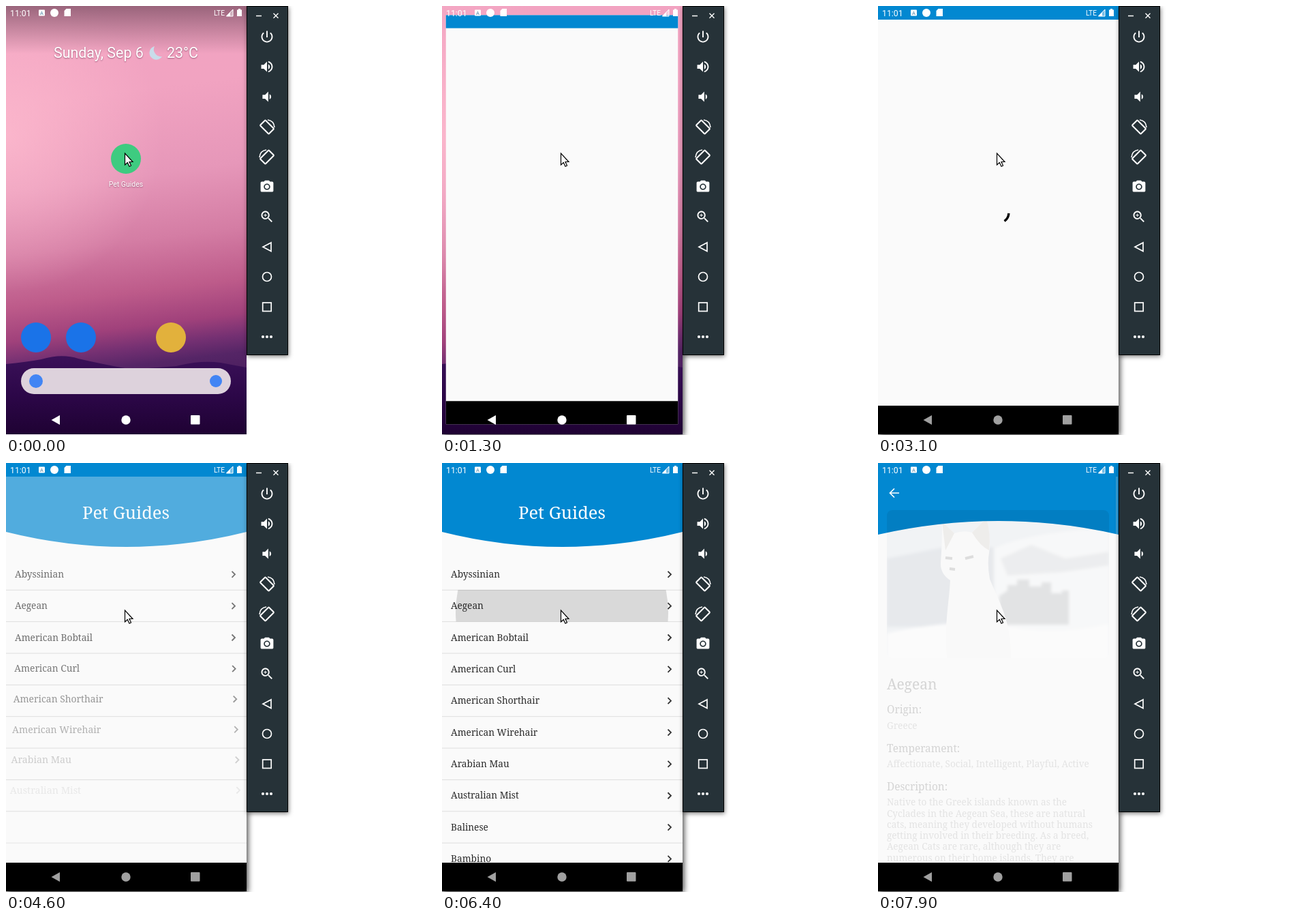
Recreate the animation shown at these times as an HTML page. Size 631x629 px, loop 8 s.

```html
<!DOCTYPE html>
<html lang="en">
<head>
<meta charset="utf-8">
<title>Phone demo</title>
<style>
html, body { margin: 0; width: 100%; height: 100%; overflow: hidden; background: #fff; }
svg { display: block; width: 631px; height: 629px; }
.sans { font-family: Roboto, sans-serif; fill: #fff; }
.serif { font-family: "Noto Serif", serif; }
.soft { text-shadow: 0 1px 2px rgba(60, 0, 40, .45); }
#shadow { filter: drop-shadow(2px 2px 4px rgba(0, 0, 0, .75)); }
#panel { filter: drop-shadow(1px 2px 3px rgba(0, 0, 0, .5)); }
.blur { filter: blur(2px); }
</style>
</head>
<body>
<svg viewBox="0 0 631 629">
  <defs>
    <linearGradient id="sky" x1=".46" y1="0" x2=".53" y2="1">
      <stop offset="0" stop-color="#f2a3c1"/>
      <stop offset=".2" stop-color="#f1a3c1"/>
      <stop offset=".4" stop-color="#e697b9"/>
      <stop offset=".55" stop-color="#d47da4"/>
      <stop offset=".67" stop-color="#bd5b8a"/>
      <stop offset=".75" stop-color="#a0417b"/>
      <stop offset=".8" stop-color="#743072"/>
      <stop offset=".84" stop-color="#552566"/>
      <stop offset="1" stop-color="#351050"/>
    </linearGradient>
    <radialGradient id="glow" gradientUnits="userSpaceOnUse" cx="0" cy="190" r="230">
      <stop offset="0" stop-color="#ffbdd0" stop-opacity=".75"/>
      <stop offset="1" stop-color="#ffbdd0" stop-opacity="0"/>
    </radialGradient>
    <linearGradient id="scrim" x1="0" y1="0" x2="0" y2="1">
      <stop offset="0" stop-color="#3a2030" stop-opacity=".48"/>
      <stop offset="1" stop-color="#3a2030" stop-opacity="0"/>
    </linearGradient>
    <linearGradient id="hill" x1="0" y1="0" x2="0" y2="1">
      <stop offset="0" stop-color="#3b1159"/>
      <stop offset=".5" stop-color="#2c0748"/>
      <stop offset="1" stop-color="#1f0233"/>
    </linearGradient>
    <clipPath id="screen"><rect width="353" height="628"/></clipPath>
    <clipPath id="body"><rect width="353" height="586"/></clipPath>
    <clipPath id="winClip"><rect id="winRect" width="353" height="628"/></clipPath>
    <clipPath id="row"><rect y="186" width="353" height="46.5"/></clipPath>
    <clipPath id="photoClip"><rect x="13" y="69" width="326" height="217" rx="8"/></clipPath>
    <clipPath id="headClip"><path d="M0 0H353V105Q176.5 65 0 105Z"/></clipPath>
  </defs>

  <rect id="shadow" width="353" height="628" fill="#222"/>
  <g clip-path="url(#screen)">
    <rect width="353" height="628" fill="url(#sky)"/>
    <rect width="353" height="480" fill="url(#glow)"/>
    <path d="M0 525Q30 522 52 518Q82 509 106 517Q145 526 180 532Q215 531 250 528Q285 519 315 523L353 530V628H0Z" fill="url(#hill)"/>

    <g id="home">
      <rect width="353" height="70" fill="url(#scrim)"/>
      <g class="sans soft" font-size="21.4">
        <text x="70" y="76">Sunday, Sep 6</text>
        <text x="236" y="76">23°C</text>
        <text x="176" y="265" font-size="10.5" text-anchor="middle">Pet Guides</text>
      </g>
      <path d="M218 59A10 10 0 1 0 229 74A10.500 10.500 0 0 1 218 59Z" fill="#c9dcea"/>
      <circle id="icon" cx="176" cy="224" r="22" fill="#3ecb80"/>
      <circle cx="44" cy="486" r="22" fill="#1a73e8"/>
      <circle cx="110" cy="486" r="22" fill="#1a73e8"/>
      <circle cx="242" cy="486" r="22" fill="#e2b13c"/>
      <rect x="22" y="531" width="308" height="38" rx="19" fill="#ddd2dc"/>
      <circle cx="44" cy="550" r="10" fill="#4285f4"/>
      <circle cx="308" cy="550" r="9" fill="#4285f4"/>
    </g>

    <g id="win"><g clip-path="url(#winClip)">
      <rect width="353" height="628" fill="#fafafa"/>
      <rect width="353" height="20" fill="#0288d1"/>
      <g clip-path="url(#body)">
        <g id="list">
          <g id="lines" stroke="#dedede"></g>
          <g clip-path="url(#row)"><circle id="ripple" cx="176" cy="219" r="0"/></g>
          <g id="rows" class="serif" font-size="13.7" fill="#2b2b2b"></g>
          <g id="listHead">
            <path d="M0 0H353V101Q176.500 145 0 101Z" fill="#0288d1"/>
            <text class="serif" x="176" y="81.500" font-size="25.500" text-anchor="middle" fill="#fff">Pet Guides</text>
          </g>
          <rect id="dim" width="353" height="586"/>
        </g>
        <g id="detail">
          <rect width="353" height="586" fill="#fafafa"/>
          <g id="photo" clip-path="url(#photoClip)">
            <rect x="13" y="69" width="326" height="217" fill="#c4cfdb"/>
            <g class="blur">
              <path d="M13 140L90 125L150 122L200 128V240H13Z" fill="#8a97aa"/>
              <path d="M170 125Q230 100 339 95V290H170Z" fill="#e8ecf0"/>
              <path d="M180 140L225 120L275 140L339 130V150L270 160L190 165Z" fill="#a9afb8"/>
              <path d="M178 195l12-8v-8h14v-8h18v10h18v-6h14v16h16v-4h10v50H178Z" fill="#6f757c"/>
              <path d="M13 250Q120 225 190 240T339 236V290H13Z" fill="#fff"/>
            </g>
            <path d="M101 286C97 235 104 208 106 172Q92 163 92 148C93 132 94 122 94 86L112 103Q126 98 138 102L159 81Q166 110 163 132Q160 148 164 170C178 205 196 232 195 286Z" fill="#f4f2ef"/>
            <path d="M94 86L112 103L99 128ZM138 102L159 81Q166 105 163 128Q150 122 138 102Z" fill="#b5aca4"/>
            <path d="M99 139l10 1M128 140l12-3M105 155l8 1" stroke="#555" stroke-width="4"/>
          </g>
          <g id="info" class="serif" fill="#222"></g>
          <path d="M0 0H353V105Q176.500 65 0 105Z" fill="#0288d1"/>
          <g clip-path="url(#headClip)"><rect id="tint" x="13" y="69" width="326" height="60" rx="8"/></g>
          <path d="M31 44H18M24 37.500L17.500 44L24 50.500" fill="none" stroke="#fff" stroke-width="1.700"/>
          <rect id="bar" x="349" y="20" width="3" height="85" fill="#fff" opacity=".2"/>
          <path id="spin2" fill="none" stroke="#000" stroke-width="3.400"/>
        </g>
      </g>
      <path id="spin1" fill="none" stroke="#000" stroke-width="3.400"/>
      <rect y="586" width="353" height="42" fill="#000"/>
    </g></g>

    <g id="nav">
      <path d="M66.500 607L79 600V614Z"/>
      <circle cx="176" cy="607" r="6.700"/>
      <rect x="271" y="600" width="13.500" height="13.500" rx="1"/>
    </g>
    <g class="sans">
      <text x="6" y="14.500" font-size="12.300">11:01</text>
      <text x="305" y="14" font-size="10.200">LTE</text>
      <rect x="48" y="5.500" width="9" height="9" rx="1"/>
      <text x="52.500" y="12.800" font-size="7.500" text-anchor="middle" style="fill:#4b83a6">A</text>
      <circle cx="71" cy="10" r="6"/>
      <path d="M88.500 4H95V15H85.500V7Z"/>
      <path d="M323.500 15H333V5Z" fill-opacity=".45" stroke="#fff" stroke-width="1"/>
      <path d="M323 15H329V9Z"/>
      <path d="M339 5.500h2V4h3v1.500h2V15h-7Z"/>
    </g>
  </g>

  <g id="panel"><rect x="353.500" y=".5" width="60" height="511" fill="#263238" stroke="#000"/></g>
  <g id="tools" fill="#fff">
    <path d="M367 14.500h8M392.500 10.700l7 7M399.500 10.700l-7 7" stroke="#fff" stroke-width="1.400"/>
    <g fill="none" stroke="#fff" stroke-width="1.700">
      <path d="M389 347V359.500L377 353.200Z"/>
      <circle cx="383" cy="397" r="6.500"/>
      <rect x="376.700" y="435" width="12.500" height="12.500"/>
    </g>
    <circle cx="377" cy="485" r="2.100"/><circle cx="383" cy="485" r="2.100"/><circle cx="389" cy="485" r="2.100"/>
    <g id="turn" fill="none" stroke="#fff" stroke-width="2">
      <rect x="-9" y="-5.500" width="18" height="11" rx="1" transform="translate(383 177.500) rotate(45)"/>
      <path d="M384 167Q393 168 394 178" stroke-width="1.600"/>
    </g>
    <use href="#turn" transform="matrix(-1 0 0 1 766 44)"/>
  </g>
  <path d="M174.500 216V233L178.300 229.500L181 235.300L183.500 234L181 228.500H186Z" fill="#fff" stroke="#000" stroke-width="1.200"/>
</svg>

<script>
const NS = 'http://www.w3.org/2000/svg';
const $ = id => document.getElementById(id);
const set = (el, attrs) => { for (const k in attrs) el.setAttribute(k, attrs[k]); };
const add = (parent, tag, attrs, text) => {
  const el = document.createElementNS(NS, tag);
  set(el, attrs);
  if (text) el.textContent = text;
  return parent.appendChild(el);
};
const clamp = x => Math.min(1, Math.max(0, x));
const show = (id, on) => { $(id).style.display = on ? '' : 'none'; };

// Side panel glyphs on a 24 unit grid
const glyphs = {
  45: 'M13 3h-2v10h2V3zm4.83 2.17l-1.42 1.42C17.99 7.86 19 9.81 19 12c0 3.87-3.13 7-7 7s-7-3.13-7-7c0-2.19 1.01-4.14 2.58-5.42L6.17 5.17C4.23 6.82 3 9.26 3 12c0 4.97 4.03 9 9 9s9-4.03 9-9c0-2.74-1.23-5.18-3.17-6.83z',
  89: 'M3 9v6h4l5 5V4L7 9H3zm13.5 3c0-1.77-1.02-3.29-2.5-4.03v8.05c1.48-.73 2.5-2.25 2.5-4.02zM14 3.23v2.06c2.89.86 5 3.54 5 6.71s-2.11 5.85-5 6.71v2.06c4.01-.91 7-4.49 7-8.77s-2.99-7.86-7-8.77z',
  133: 'M18.5 12c0-1.77-1.02-3.29-2.5-4.03v8.05c1.48-.73 2.5-2.25 2.5-4.02zM5 9v6h4l5 5V4L9 9H5z',
  265: 'M9 2L7.17 4H4c-1.1 0-2 .9-2 2v12c0 1.1.9 2 2 2h16c1.1 0 2-.9 2-2V6c0-1.1-.9-2-2-2h-3.17L15 2H9zm3 15c-2.76 0-5-2.24-5-5s2.24-5 5-5 5 2.24 5 5-2.24 5-5 5zm0-1.8a3.2 3.2 0 1 0 0-6.400a3.2 3.2 0 1 0 0 6.400z',
  309: 'M15.5 14h-.79l-.28-.27C15.41 12.59 16 11.11 16 9.5 16 5.91 13.09 3 9.5 3S3 5.91 3 9.5 5.91 16 9.5 16c1.61 0 3.09-.59 4.23-1.57l.27.28v.79l5 4.99L20.49 19l-4.99-5zm-6 0C7.01 14 5 11.99 5 9.5S7.01 5 9.5 5 14 7.01 14 9.5 11.99 14 9.5 14zm2.5-4h-2v2H9v-2H7V9h2V7h1v2h2v1z'
};
for (const y in glyphs)
  add($('tools'), 'path', { d: glyphs[y], 'fill-rule': 'evenodd', transform: `translate(371.7 ${y - 11.2}) scale(.94)` });

const names = ['Abyssinian', 'Aegean', 'American Bobtail', 'American Curl', 'American Shorthair',
  'American Wirehair', 'Arabian Mau', 'Australian Mist', 'Balinese', 'Bambino'];
const STEP = 46.35;
const rows = names.map((name, i) => {
  const g = add($('rows'), 'g', {});
  add(g, 'text', { x: 13, y: 4.7 }, name);
  add(g, 'path', { d: 'M331.500 -4.500L336 0L331.500 4.500', fill: 'none', stroke: '#333', 'stroke-width': 1.8 });
  const y = 186.3 + STEP * i;
  const line = add($('lines'), 'path', { d: `M0 ${y}H353` });
  return { g, line, y: 163.3 + STEP * i };
});

const put = (y, size, text, opacity = 1) => add($('info'), 'text', { x: 13, y, 'font-size': size, opacity }, text);
put(331.5, 21, 'Aegean');
put(367, 15.4, 'Origin:');
put(389.5, 13.6, 'Greece', .6);
put(423.5, 15.4, 'Temperament:');
put(446, 13.6, 'Affectionate, Social, Intelligent, Playful, Active', .6);
put(480, 15.4, 'Description:');
['Native to the Greek islands known as the', 'Cyclades in the Aegean Sea, these are natural',
  'cats, meaning they developed without humans', 'getting involved in their breeding. As a breed,',
  'Aegean Cats are rare, although they are', 'numerous on their home islands. They are'
].forEach((s, i) => put(502.3 + 16.25 * i, 13.6, s, .6));

// cubic-bezier(.4, 0, .2, 1)
const ease = x => {
  let lo = 0, hi = 1, m;
  for (let i = 0; i < 18; i++) {
    m = (lo + hi) / 2;
    const n = 1 - m;
    if (1.2 * m * n * n + .6 * m * m * n + m ** 3 < x) lo = m; else hi = m;
  }
  return 3 * m * m * (1 - m) + m ** 3;
};

function spinner(id, on, ms) {
  show(id, on);
  if (!on) return;
  ms = Math.max(0, ms);
  const u = ms / 1333 % 1;
  const head = ease(clamp(u * 2)), tail = u > .5 ? ease(u * 2 - 1) : 0;
  const a = Math.PI * (-.5 + tail * 1.5 + ms / 2222 * 2 + u * .5);
  const sweep = Math.max((head - tail) * 1.5 * Math.PI, .02);
  const pt = w => `${176.5 + 15.4 * Math.cos(w)} ${303 + 15.4 * Math.sin(w)}`;
  $(id).setAttribute('d', `M${pt(a)}A15.4 15.4 0 ${+(sweep > Math.PI)} 1 ${pt(a + sweep)}`);
}

const fade = ms => 1 - (1 - clamp(ms / 1620)) ** 1.6;

// Opening window: time, x, y, width, height
const opening = [[1100, 112, 140, 128, 190], [1200, 34, 60, 284, 480], [1300, 5.5, 13.2, 341, 600],
  [1400, 2, 4, 349, 618], [1500, 0, 0, 353, 628]];

function draw(t) {
  show('shadow', t >= 700);
  $('icon').setAttribute('fill', t >= 600 && t < 900 ? '#37b873' : '#3ecb80');
  set($('home'), { opacity: t < 1100 ? 1 : t < 1200 ? .5 : 0 });

  show('win', t >= 1100);
  const [, x, y, w, h] = opening.filter(o => o[0] <= t).pop() || opening[0];
  const k = w / 353;
  set($('win'), { transform: `translate(${x} ${y}) scale(${k})`, opacity: t < 1200 ? .7 : 1 });
  set($('winRect'), { height: h / k });
  const c = Math.round(255 - 95 * clamp((t - 1500) / 600));
  $('nav').setAttribute('fill', `rgb(${c},${c},${c})`);

  spinner('spin1', t >= 2000 && t < 3800, t - 2080);

  const page = fade(t - 3780);
  show('list', t >= 3800);
  set($('listHead'), { opacity: page });
  rows.forEach(({ g, line, y }, i) => {
    const p = clamp((t - 3840 - 100 * i) / 500);
    set(g, {
      opacity: page * p,
      transform: `translate(176.5 ${y - 9 * (1 - p)}) scale(${1 + .05 * (1 - p)}) translate(-176.5 0)`
    });
    set(line, { opacity: clamp((t - 3700 - 90 * i) / 250) });
  });

  const ms = t - 6400;
  set($('ripple'), { r: ms < 0 ? 0 : 156 + ms * .7, opacity: ms < 0 ? 0 : .132 * clamp(1 - ms / 400) });

  const s = clamp((t - 6600) / 600), slide = s * s * (3 - 2 * s);
  set($('list'), { transform: `translate(${-353 * slide} 0)` });
  set($('dim'), { opacity: .98 * slide });
  show('detail', slide > 0);
  set($('detail'), { transform: `translate(${353 * (1 - slide)} 0)` });
  show('bar', t >= 7200);
  spinner('spin2', t < 7700, t - 6650);

  const info = fade(t - 7720);
  set($('photo'), { opacity: info });
  set($('info'), { opacity: info });
  set($('tint'), { opacity: info * .4 });
}

const start = performance.now();
function tick() {
  const t = (performance.now() - start) % 8000;
  draw(Math.floor(t / 100) * 100);
  requestAnimationFrame(tick);
}
tick();
</script>
</body>
</html>
```
